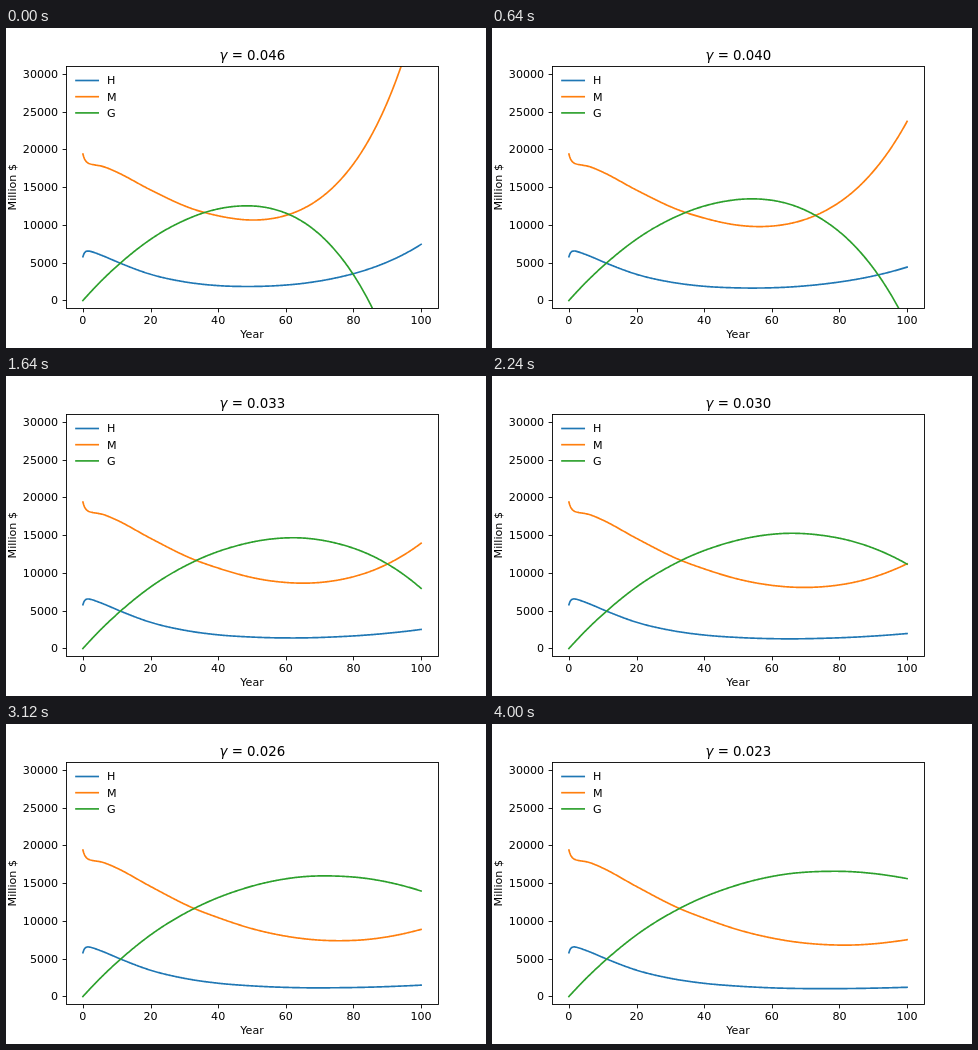
Write an HTML page that moves like this. It is 480 by 320 pixels and loops after 4040 ms.

```html
<!DOCTYPE html>
<html lang="en">
<head>
<meta charset="utf-8">
<title>Effect of the growth rate</title>
<style>
html, body { margin: 0; width: 100%; height: 100%; overflow: hidden; background: #fff; }
svg { display: block; width: 480px; height: 320px; }
text { font: 11.11px "DejaVu Sans", sans-serif; fill: #000; }
.title { font-size: 13.33px; }
.title tspan { font-style: italic; }
.mid { text-anchor: middle; }
.end { text-anchor: end; }
.axis { fill: none; stroke: #000; stroke-width: .89; }
.line { fill: none; stroke-width: 1.667; stroke-linecap: square; stroke-linejoin: round; }
</style>
</head>
<body>
<svg viewBox="0 0 480 320">
  <clipPath id="plot"><rect x="60" y="38.4" width="372" height="241.6"/></clipPath>
  <g id="curves" clip-path="url(#plot)"></g>
  <path id="ticks" class="axis"/>
  <rect class="axis" x="60.5" y="38.5" width="372" height="242"/>
  <g id="labels"></g>
  <text class="mid" x="246" y="310.3">Year</text>
  <text class="mid" transform="translate(10.2 159.2) rotate(-90)">Million $</text>
  <text class="title mid" x="246.4" y="31.7" xml:space="preserve"><tspan>γ</tspan><tspan id="gamma" style="font-style:normal"></tspan></text>
</svg>
<script>
const FRAME = 40, FRAMES = 101;
const { exp, LN2 } = Math;
const $ = id => document.getElementById(id);
const px = year => 76.91 + year * 3.3818;
const py = value => 272.45 - value * 0.00755;
const snap = v => Math.floor(v + 0.5) + 0.5;

function add(parent, tag, attrs, text = '') {
  const el = document.createElementNS('http://www.w3.org/2000/svg', tag);
  for (const key in attrs) el.setAttribute(key, attrs[key]);
  el.textContent = text;
  return parent.appendChild(el);
}

// Smooth curve through [x, y] knots (cubic Hermite)
function spline(knots) {
  const n = knots.length - 1;
  const step = i => knots[i + 1][0] - knots[i][0];
  const rise = i => (knots[i + 1][1] - knots[i][1]) / step(i);
  const slope = [];
  for (let i = 1; i < n; i++) {
    slope[i] = (step(i - 1) * rise(i) + step(i) * rise(i - 1)) / (step(i - 1) + step(i));
  }
  slope[0] = (3 * rise(0) - slope[1]) / 2;
  slope[n] = (3 * rise(n - 1) - slope[n - 1]) / 2;
  return x => {
    let i = 0;
    while (i < n - 1 && x > knots[i + 1][0]) i++;
    const h = step(i), u = (x - knots[i][0]) / h, v = 1 - u;
    return v * v * ((1 + 2 * u) * knots[i][1] + u * h * slope[i])
         + u * u * ((1 + 2 * v) * knots[i + 1][1] - v * h * slope[i + 1]);
  };
}

// Parts that do not depend on gamma
const baseH = spline([[0, 6850], [3, 6370], [5.9, 5840], [11.2, 4764], [20, 3194],
  [30, 2020], [40, 1270], [50, 805], [62, 425], [78, 150], [100, -44]]);
const baseM = spline([[0, 18120], [3, 17930], [6, 17640], [8, 17270], [10, 16830], [20, 14175],
  [32.7, 10945], [40, 9440], [50, 7551], [64.5, 5424], [80.5, 3813], [100, 2666]]);
const baseG = spline([[0, 0], [5, 2530], [11.2, 5337], [20, 8821], [32.7, 12759],
  [48.5, 16345], [62, 18559], [78.5, 20310], [100, 21718]]);

// Parts driven by exponential growth at rate g
const gainH = (t, g) => 8.5 * exp(-0.0072 * t) * (1 - exp(-t / 12)) * exp(g * t) / (g + 0.01);
const gainM = (t, g) => 36.5 * (1 - exp(-t / 30)) * exp(g * t) / (g + 0.05);
const drift = (t, g) => (289 * g * g * exp(g * t)) ** 2;

const series = [
  { name: 'H', color: '#1f77b4', at: (t, g) => baseH(t) - 1050 * exp(-t / 0.6) + gainH(t, g) },
  { name: 'M', color: '#ff7f0e', at: (t, g) => baseM(t) + 1280 * exp(-t / 0.7) + gainM(t, g) },
  { name: 'G', color: '#2ca02c', at: (t, g) => baseG(t) - gainH(t, g) - gainM(t, g) + drift(t, g) }
];

const labels = $('labels');
let ticks = '';
for (let year = 0; year <= 100; year += 20) {
  ticks += `M${snap(px(year))} 280.5v3.9`;
  add(labels, 'text', { class: 'mid', x: px(year), y: 296 }, year);
}
for (let value = 0; value <= 30000; value += 5000) {
  ticks += `M60.5 ${snap(py(value))}h-3.9`;
  add(labels, 'text', { class: 'end', x: 52.2, y: py(value) + 4 }, value);
}
$('ticks').setAttribute('d', ticks);

series.forEach((s, i) => {
  const y = 56.4 + i * 16.2;
  s.path = add($('curves'), 'path', { class: 'line', stroke: s.color });
  add(labels, 'path', { class: 'line', stroke: s.color, d: `M70 ${y - 3.9}h22.2` });
  add(labels, 'text', { x: 101.1, y }, s.name);
});

function draw(frame) {
  const doubling = 15 + 0.15 * frame;
  const g = LN2 / doubling;
  $('gamma').textContent = ' = ' + g.toFixed(3);
  for (const s of series) {
    const points = [];
    for (let t = 0; t <= 100; t += 0.25) {
      points.push(px(t).toFixed(2) + ' ' + py(s.at(t, g)).toFixed(2));
    }
    s.path.setAttribute('d', 'M' + points.join('L'));
  }
}

let shown = -1;
function tick() {
  const frame = Math.floor(performance.now() / FRAME) % FRAMES;
  if (frame !== shown) draw(shown = frame);
  requestAnimationFrame(tick);
}
tick();
</script>
</body>
</html>
```
